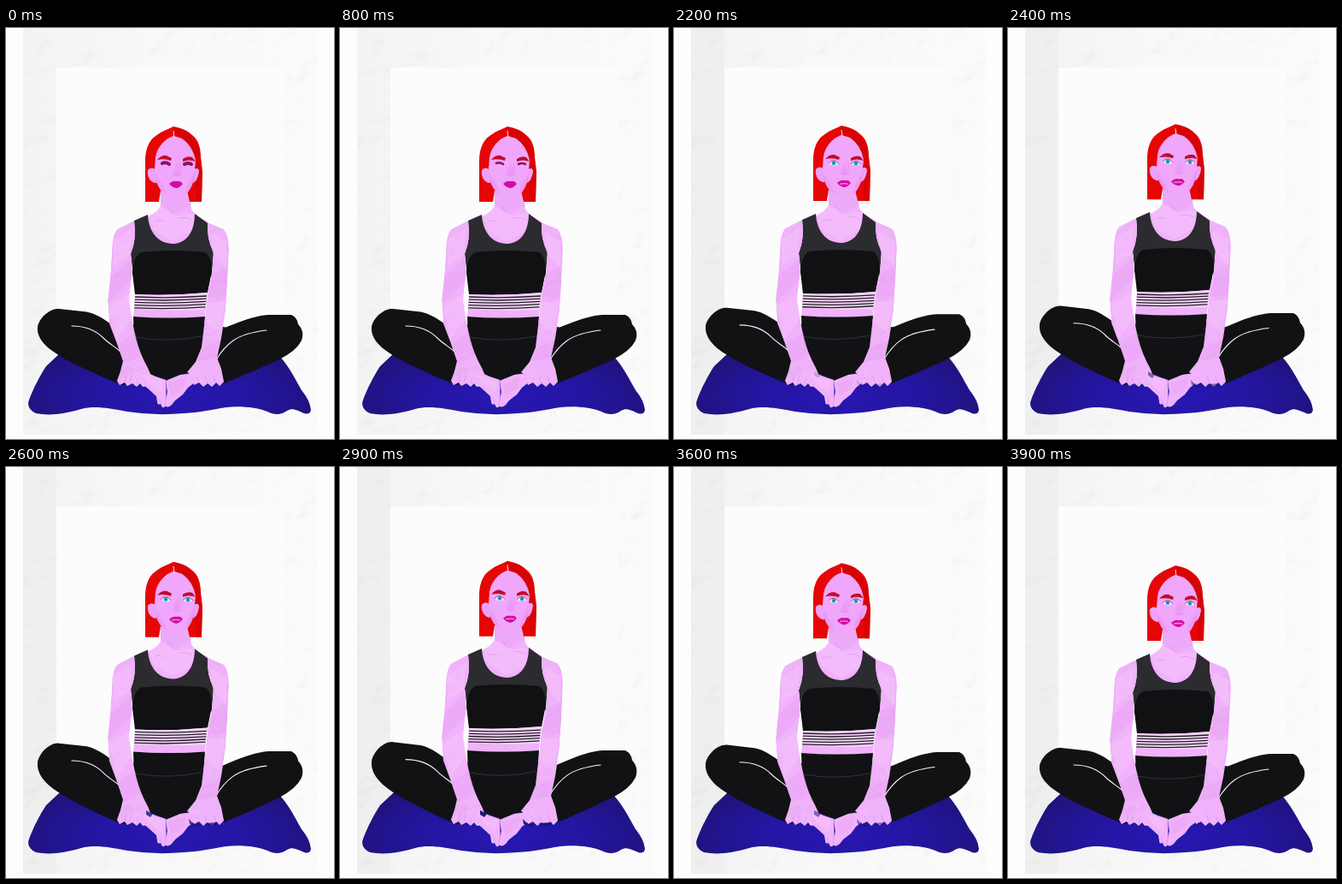
Animation, 384 px wide and 480 px high, one loop 4.4 s. Source, as an HTML page:

```html
<!DOCTYPE html>
<html lang="en">
<head>
<meta charset="utf-8">
<title>Breathing exercise</title>
<style>
  html, body { margin: 0; width: 100%; height: 100%; overflow: hidden; background: #fdfdfd; }
  svg { display: block; width: 100vw; height: 100vh; }
  .skin { fill: #f0b2fa; }
  .cloth { fill: #121114; }
  .seam { fill: none; stroke: #f6f3f8; stroke-width: 1.1; stroke-linecap: round; }
  .fold { fill: #f8c6fd; opacity: .45; }
  .shade { fill: #e59cf2; opacity: .35; }
  .crease { fill: none; stroke: #d88ae6; stroke-width: .8; opacity: .75; stroke-linecap: round; }
  .brow { fill: #c00d2a; }
</style>
</head>
<body>
<svg viewBox="0 0 384 480" preserveAspectRatio="none">
  <defs>
    <filter id="crumple" x="0" y="0" width="100%" height="100%" color-interpolation-filters="sRGB">
      <feTurbulence type="fractalNoise" baseFrequency=".022 .027" numOctaves="3" seed="8"/>
      <feDiffuseLighting surfaceScale=".7" diffuseConstant="1.15" lighting-color="#fff" result="light">
        <feDistantLight azimuth="225" elevation="61"/>
      </feDiffuseLighting>
      <feBlend in="SourceGraphic" in2="light" mode="multiply"/>
      <feComposite in2="SourceGraphic" operator="in"/>
    </filter>
    <radialGradient id="blue" cx=".5" cy=".8" r=".55">
      <stop offset="0" stop-color="#2817b4"/>
      <stop offset=".5" stop-color="#2416a2"/>
      <stop offset="1" stop-color="#1f137c"/>
    </radialGradient>
    <linearGradient id="page">
      <stop offset="0" stop-color="#f3f3f3"/>
      <stop offset=".4" stop-color="#f8f8f8"/>
      <stop offset="1" stop-color="#fbfbfb"/>
    </linearGradient>
  </defs>

  <!-- paper -->
  <rect width="384" height="480" fill="#fdfdfd"/>
  <g filter="url(#crumple)">
    <rect x="20" width="345" height="475" fill="url(#page)"/>
  </g>
  <path id="tone" d="M20 0H59V475H20Z" fill="#888" opacity="0"/>
  <rect x="59" y="46" width="266" height="380" fill="#fcfcfc"/>

  <!-- mat -->
  <path fill="url(#blue)" d="M62 381C92 358 116 350 144 347Q188 340 232 345C270 350 300 362 321 384C332 396 339 411 346 423Q356 435 357 446Q356 452 349 450C341 447 336 443 329 447C322 452 314 452 306 448C294 443 274 441 258 443C240 446 226 449 208 450Q174 453 142 448C120 444 104 441 88 445C68 451 50 453 35 450Q26 446 26 438C30 424 41 404 47 395Z"/>

  <!-- legs -->
  <path id="legL" class="cloth" d="M62 328C52 327 39 338 37 349C36 359 42 367 50 374C65 386 86 395 105 404Q122 412 137 417L166 405L152 353Q134 351 122 345C110 337 102 332 90 331Z"/>
  <path id="legR" class="cloth" d="M232 360C252 353 281 337 307 335H334Q341 338 342 346Q350 354 346 365Q340 377 320 387C300 396 280 405 255 415L222 401Z"/>
  <g id="hips">
    <path class="cloth" d="M149 336Q190 339 233 336L231 372L222 400L188 411L163 402L150 372Z"/>
    <path d="M151 361Q189 368 229 360" fill="none" stroke="#37343c" stroke-width=".9"/>
  </g>
  <path id="seamL" class="seam" d="M77 348C95 348 106 354 114 362S130 373 138 382"/>
  <path id="seamR" class="seam" d="M305 353C288 355 276 358 266 365S251 379 245 389"/>

  <!-- torso -->
  <g id="torso">
    <g filter="url(#crumple)">
      <path class="skin" d="M180 180H214L217 211Q219 217 236 226L243 262L236 310L233 337Q190 340 149 337L151 310L147 262L150 226Q180 217 181 206Z"/>
      <path class="shade" d="M181 190L214 196L216 208L198 218L181 207Z"/>
      <path class="fold" d="M181 208L199 219L219 216V236L195 249L173 236L167 219Z"/>
      <path class="crease" d="M184 226Q178 223 174 226M203 222Q211 220 217 224M189 207L195 216"/>
    </g>
    <path fill="#2c2b30" d="M150 225L166 218C167 238 178 252 196 252C213 251 221 236 221 217L236 228Q235 247 243 262L241 290H149L146 264Q153 247 150 225Z"/>
    <path fill="#111013" d="M148 286Q149 267 158 262Q194 258 234 262Q241 269 241 284L236 309Q193 313 151 311Z"/>
    <path fill="#f4d3f7" d="M151 311Q193 313 236 309L233 329Q190 331 150 328Z"/>
    <g id="bands" fill="none" stroke="#241d28" stroke-width="1.3"></g>
  </g>

  <!-- arms -->
  <g id="arms">
    <g filter="url(#crumple)">
      <path class="skin" d="M150 225Q153 248 146 263L148 285L146 300L144 318L148 343L152 363Q157 381 166 397L169 404L164 410L166 418L160 419L157 415L153 419L148 415L142 418L139 414L133 417L130 412L134 401L137 389L129 366L121 345L119 318L122 290L124 262Q124 242 130 235Z"/>
      <path class="fold" d="M126 248L147 234L145 265L126 278Z"/>
      <path class="shade" d="M122 292L146 270L147 294L120 321Z"/>
      <path class="fold" d="M120 325L145 310L147 340L129 364Z"/>
      <path class="shade" d="M131 369L151 356L158 383L138 392Z"/>
      <path class="skin" d="M236 227L255 235Q261 242 261 259L259 300L257 330L252 362L247 385L252 398L255 413L250 418L246 414L241 419L236 415L231 419L226 414L220 417L218 409L212 402L222 390L229 373L233 339L236 310L241 286L243 262Q235 247 236 227Z"/>
      <path class="fold" d="M239 239L258 249L258 280L242 263Z"/>
      <path class="shade" d="M242 287L259 278L258 313L237 315Z"/>
      <path class="fold" d="M236 320L256 319L251 358L233 343Z"/>
      <path class="shade" d="M230 375L250 365L246 386L225 389Z"/>
    </g>
  </g>

  <!-- feet -->
  <path fill="#171132" d="M163 403L187 411L212 402L224 409L211 416L188 415L168 412Z"/>
  <g filter="url(#crumple)">
    <path class="skin" d="M150 396Q163 401 175 407L187 411L187 425L188 438Q187 444 183 443L181 439Q177 441 177 436L176 430L165 420L155 413Z"/>
    <path class="skin" d="M187 412L204 405L226 402L222 413L213 420L207 428L198 435L194 440Q188 445 186 440L189 425Z"/>
    <path class="fold" d="M160 404L185 412L181 426L167 415Z"/>
    <path class="shade" d="M190 415L211 408L208 421L194 429Z"/>
  </g>
  <path class="crease" d="M187 412L188 428L186 440M181 438L180 433M145 414L147 406M154 415L154 409M139 413L141 406M235 414L233 407M245 413L243 406"/>
  <path id="fingers" fill="#1b1570" opacity="0" d="M164 401L172 405L169 409L164 406ZM214 411L220 417L229 417L225 420L215 417ZM233 416L248 415L245 419L236 419Z"/>

  <!-- head -->
  <g id="head">
    <path fill="#e60606" d="M163 203L163 156C163 142 167 132 174 127C181 121 188 119 196 115C205 117 212 119 218 125C226 131 228 141 228 152L230 168L229 203H215L212 190H181L179 203Z"/>
    <path fill="#c90207" opacity=".5" d="M197 116C212 118 226 130 228 150L230 168L229 203H223L221 154Q214 132 197 124Z"/>
    <path fill="#eda2f8" d="M176 166Q170 161 166 166C165 174 169 181 176 181ZM220 165Q226 162 226 168Q224 179 219 181Z"/>
    <path fill="#f0a6fb" d="M196 126C187 129 177 138 175 151L174 164L176 179Q179 189 187 195Q199 201 210 195Q218 188 220 174L222 155Q219 138 206 129Z"/>
    <path fill="#e78df2" opacity=".45" d="M200 157L205 171L200 174L195 171ZM175 170L184 184L188 195Q178 188 175 177ZM221 168L212 184L210 195Q219 186 221 174Z"/>
    <path d="M196 120L197 128" stroke="#ffd9e4" stroke-width="1"/>
    <path class="brow" d="M177 154Q182 148 188 149L194 152L193 155Q186 152 177 154ZM207 153Q212 149 218 151L222 156Q214 153 207 156Z"/>
    <path class="crease" d="M196 171Q200 174 205 171M203 158L205 166"/>
    <path id="lids" fill="none" stroke="#8a1262" stroke-linecap="round" d="M183 158Q187 156 191 159M209 159Q213 157 217 159"/>
    <g id="eyes">
      <path fill="#f7eefb" d="M181 159Q187 152 193 160Q187 164 181 159ZM207 160Q213 153 219 160Q213 164 207 160Z"/>
      <circle cx="187" cy="158.6" r="2.5" fill="#28b4c8"/>
      <circle cx="213" cy="159.3" r="2.5" fill="#28b4c8"/>
      <circle cx="187" cy="158.6" r=".9" fill="#19506c"/>
      <circle cx="213" cy="159.3" r=".9" fill="#19506c"/>
      <path fill="none" stroke="#a8207c" stroke-width=".8" d="M181 159Q187 152 193 160M207 160Q213 153 219 160"/>
    </g>
    <path fill="#d20ca2" d="M191 182Q195 178 199 179L204 179L207 182Q203 187 199 187Q194 186 191 182Z"/>
    <path id="smile" fill="none" stroke="#f290e4" stroke-width="1.3" d="M194 183Q200 182 204 183"/>
  </g>
</svg>
<script>
  const $ = id => document.getElementById(id);
  const set = (id, name, value) => $(id).setAttribute(name, value);
  const LOOP = 4400, STEP = 100, INHALE = 2200, STEPS = 18;
  const GROUND = 415;

  $('bands').innerHTML = [0, 1, 2, 3, 4].map(i => {
    const y = 314 + i * 3.2;
    return `<path d="M${151 - i * .2} ${y}Q193 ${y + 2} ${235 - i * .4} ${y - 1}"/>`;
  }).join('');

  // stretch vertically from a fixed base line
  const stretch = (id, base, k) =>
    set(id, 'transform', `translate(0 ${base}) scale(1 ${k}) translate(0 ${-base})`);
  const lift = (id, y) => set(id, 'transform', `translate(0 ${-y})`);

  // one slow breath, redrawn ten times a second
  function breath(t) {
    if (t < INHALE) return 0;
    const n = Math.min(STEPS, Math.floor((t - INHALE) / STEP) + 1);
    return Math.sin(Math.PI * n / STEPS);
  }

  function draw(now) {
    const t = now % LOOP;
    const p = breath(t);
    stretch('legL', GROUND, 1 + .08 * p);
    stretch('legR', GROUND, 1 + .05 * p);
    stretch('hips', GROUND, 1 + .08 * p);
    stretch('arms', GROUND, 1 + .031 * p);
    lift('seamL', 6.5 * p);
    lift('seamR', 5 * p);
    lift('torso', 6 * p);
    lift('head', 5.4 * p);
    set('fingers', 'opacity', p);
    set('tone', 'opacity', t < INHALE ? 0 : .04);

    const open = t < 1200 ? 0 : t < 1700 ? .5 : 1;
    stretch('eyes', 160, open);
    set('lids', 'stroke-width', t < 400 ? 4 : t < 800 ? 3.4 : 2.6);
    set('lids', 'opacity', open === 1 ? 0 : 1);
    set('smile', 'opacity', open);
  }

  function tick(now) {
    draw(now);
    requestAnimationFrame(tick);
  }
  draw(0);
  requestAnimationFrame(tick);
</script>
</body>
</html>
```
